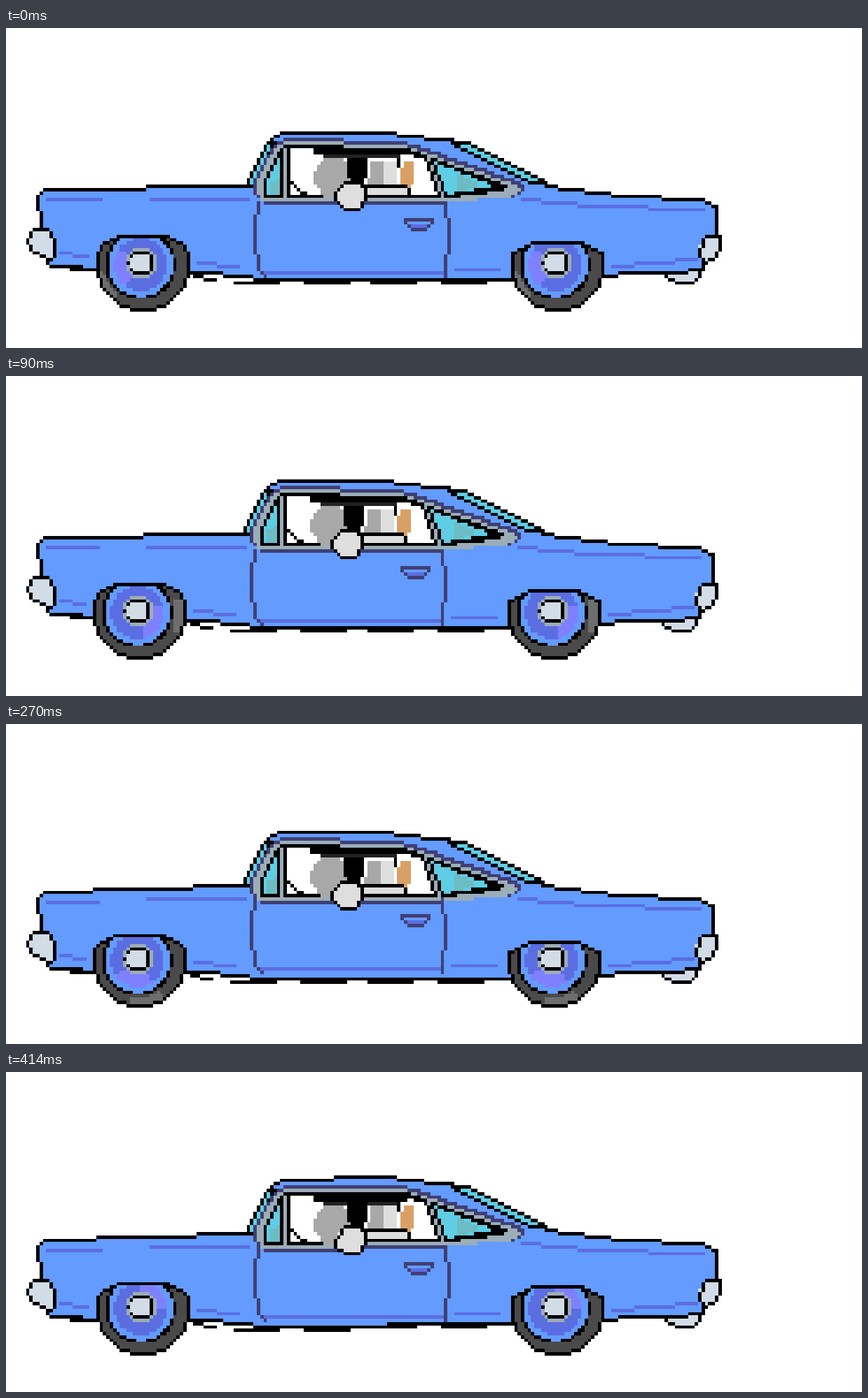
An HTML page with a canvas that plays this animation: 1222x458 px, repeating every 450 ms.

```html
<!DOCTYPE html>
<html lang="en">
<head>
<meta charset="utf-8">
<title>Blue car</title>
<style>
  html, body { margin: 0; width: 100%; height: 100%; overflow: hidden; background: #fff; }
  canvas { display: block; width: 1222px; height: 458px; image-rendering: pixelated; }
</style>
</head>
<body>
<canvas id="car" width="256" height="96"></canvas>
<script>
const g = document.getElementById('car').getContext('2d');
const STEP = 90, TURN = 2 * Math.PI;
const INK = '#000', WHITE = '#fff', BLUE = '#639bff', DEEP = '#5b6ee1', VIOLET = '#7f80ff',
      PLUM = '#3f3f74', CYAN = '#5fcde4', TEAL = '#6cbcc4', STEEL = '#9badb7', CHROME = '#d2dce6',
      TYRE = '#4a4a4a', SHINE = '#6e6e6e', GREY = '#a8a8a8', PALE = '#dedede', TAN = '#d9a066';

// How far the car slides, and how deep its tail and nose sink, in cells.
const poses = [
  { slide: 0, tail: 0, nose: 0 },
  { slide: -1, tail: 0, nose: 0 },
  { slide: -1, tail: 1, nose: 1 },
  { slide: -1, tail: 1.7, nose: .7 },
  { slide: 0, tail: 2, nose: 0 }
];
let pose = poses[0], rigid = false;

const sink = x => {
  const k = Math.min(1, Math.max(0, 1 - (x - 10) / 120));
  return pose.nose + (pose.tail - pose.nose) * k;
};
const place = (x, y) => [x < 20 ? x : x + pose.slide, rigid ? y : Math.round(y + sink(x))];

function dot(color, x, y, w = 1, h = 1) {
  g.fillStyle = color;
  g.fillRect(x, y, w, h);
}
const box = (color, x, y, w, h) => dot(color, ...place(x, y), w, h);

function points(text) {
  const n = text.trim().split(/\s+/).map(Number), out = [];
  for (let i = 0; i < n.length; i += 2) out.push(place(n[i], n[i + 1]));
  return out;
}

function trace(color, list) {
  for (let i = 1; i < list.length; i++) {
    const [ax, ay] = list[i - 1], [bx, by] = list[i];
    const n = Math.max(Math.abs(bx - ax), Math.abs(by - ay)) || 1;
    for (let k = 0; k <= n; k++)
      dot(color, Math.round(ax + (bx - ax) * k / n), Math.round(ay + (by - ay) * k / n));
  }
}
const line = (color, text) => trace(color, points(text));

function area(fill, edge, text) {
  const list = points(text);
  list.push(list[0]);
  for (let y = 0; y < 96; y++) {
    const cuts = [], v = y + .001;
    for (let i = 1; i < list.length; i++) {
      const [ax, ay] = list[i - 1], [bx, by] = list[i];
      if ((ay > v) !== (by > v)) cuts.push(ax + (bx - ax) * (v - ay) / (by - ay));
    }
    cuts.sort((a, b) => a - b);
    for (let i = 0; i + 1 < cuts.length; i += 2) {
      const x = Math.round(cuts[i]);
      dot(fill, x, y, Math.round(cuts[i + 1]) - x + 1);
    }
  }
  trace(edge, list);
}

function shell() {
  for (let i = 0; i < 4; i++) box(INK, 68 + Math.round(20.5 * i), 76, 14, 1);
  line(INK, '19 72 26 72');
  line(INK, '56 74 62 75');
  area(BLUE, INK, `10 60 10 55 9 54 9 50 11 48 71 47 78 34 80 32 82 31 112 31 138 34 161 46
    161 47 184 50 208 51 212 53 212 62 208 71 206 73 186 73 178 74 148 75 79 75
    68 74 62 73 55 73 27 72 19 71 13 71 10 67`);
  line(DEEP, '12 51 28 51');
  line(DEEP, '43 51 72 51');
  line(DEEP, '154 51 176 53 208 54');
  line(DEEP, '16 67 24 68');
  line(DEEP, '181 71 206 69');
  line(DEEP, '57 70 69 71');
}

function cabin() {
  area(CYAN, INK, '71 47 78 34 80 34 73 47');
  area(CYAN, INK, '138 34 161 46 156 46 133 34');
  // Nested window frame, outside in.
  area(PLUM, PLUM, '74 49 74 46 78 38 80 35 83 33 118 34 122 35 153 46 154 48 150 50 131 51 129 52 77 52');
  area(STEEL, STEEL, '75 49 75 46 79 38 81 35 84 34 118 35 121 36 152 47 153 48 150 50 131 51 76 51');
  area(INK, INK, '77 49 77 46 81 37 83 35 119 36 149 47 148 48 131 50 77 50');
  area(WHITE, WHITE, '78 49 78 46 82 37 84 36 118 37 144 47 131 49');

  area(CYAN, CYAN, '78 49 78 46 81 39 81 49');
  area(TEAL, TEAL, '79 49 79 46 81 45 81 49');
  line(INK, '82 37 82 50');
  line(STEEL, '83 36 83 50');
  line(INK, '84 36 84 50');
  line(INK, '85 46 87 48 90 50');

  area(CYAN, INK, '127 39 131 50 147 47');
  area(TEAL, TEAL, '135 44 140 46 140 47 135 48');
  line(STEEL, '126 39 130 50');
  line(INK, '125 38 129 50');
}

function door() {
  rigid = true;
  line(DEEP, '77 73 130 73');
  line(DEEP, '134 72 147 72');
  line(PLUM, '75 52 75 55 74 56 74 67 75 68 75 72 77 74');
  line(PLUM, '131 52 131 56 132 57 132 67 131 68 131 74');
  area(BLUE, PLUM, '119 57 127 57 127 58 125 60 121 60 119 58');
  box(DEEP, 121, 59, 5, 1);
  rigid = false;
}

function driver() {
  area(GREY, GREY, '95 39 100 39 102 42 102 47 99 50 95 50 92 46 92 43');
  box(INK, 92, 36, 4, 2);
  box(INK, 95, 36, 25, 2);
  box('#222', 95, 38, 23, 1);
  box(GREY, 108, 40, 5, 7);
  box(PALE, 113, 40, 4, 7);
  box(INK, 102, 39, 6, 6);
  box(INK, 103, 45, 4, 2);
  box(WHITE, 108, 40, 1, 5);
  box(INK, 117, 39, 1, 3);
  area(TAN, TAN, '119 40 121 40 121 45 120 48 118 47 118 43');
  area(PALE, INK, '106 47 119 47 120 48 120 50 106 50');
  area(PALE, INK, '101 46 105 46 107 48 107 51 105 54 101 54 98 51 98 49');
}

function chrome() {
  area(CHROME, INK, '8 60 12 60 14 63 14 67 13 69 10 68 7 66 6 63');
  area(CHROME, INK, '209 62 213 62 213 65 211 69 208 70 207 67 208 63');
  area(CHROME, INK, '198 73 208 72 206 75 204 76 200 76 197 74');
}

function wheel(x, arch, spin) {
  const cx = x + pose.slide, cy = 70.5, top = Math.round(arch + sink(x));
  const inside = (px, py) => py >= top && Math.hypot(px - cx, py - cy) < 14.1
    && Math.abs(px - cx) < 8.5 + 2 * (py - top);
  const off = (a, b) => Math.abs(Math.atan2(Math.sin(a - b), Math.cos(a - b)));

  function shade(px, py) {
    const dx = px - cx + .7, dy = py - cy, d = Math.hypot(dx, dy), a = Math.atan2(dy, dx);
    const cap = Math.hypot(dx, dy + .5);
    if (cap < 3) return CHROME;
    if (cap < 3.9) return INK;
    if (cap < 4.8) return STEEL;
    if (d < 8) return off(a, spin) < .8 ? VIOLET : DEEP;
    if (d < 9.6) return BLUE;
    if (d < 10.5) return INK;
    return d > 11.2 && off(a, spin - .4) < .4 ? SHINE : TYRE;
  }

  for (let py = top; py < 85; py++)
    for (let px = cx - 13.5; px < cx + 14; px++) {
      if (!inside(px, py)) continue;
      const edge = !inside(px - 1, py) || !inside(px + 1, py) || !inside(px, py - 1) || !inside(px, py + 1);
      dot(edge ? INK : shade(px, py), px, py);
    }
}

function draw(i) {
  pose = poses[i];
  g.clearRect(0, 0, 256, 96);
  shell();
  cabin();
  door();
  driver();
  chrome();
  const spin = 3 + .6 * TURN * i;
  wheel(40.5, 62, spin);
  wheel(164.5, 64, spin);
}

let shown = -1;
const start = performance.now();
function tick() {
  const now = Math.floor((performance.now() - start) / STEP) % poses.length;
  if (now !== shown) draw(shown = now);
  requestAnimationFrame(tick);
}
tick();
</script>
</body>
</html>
```
